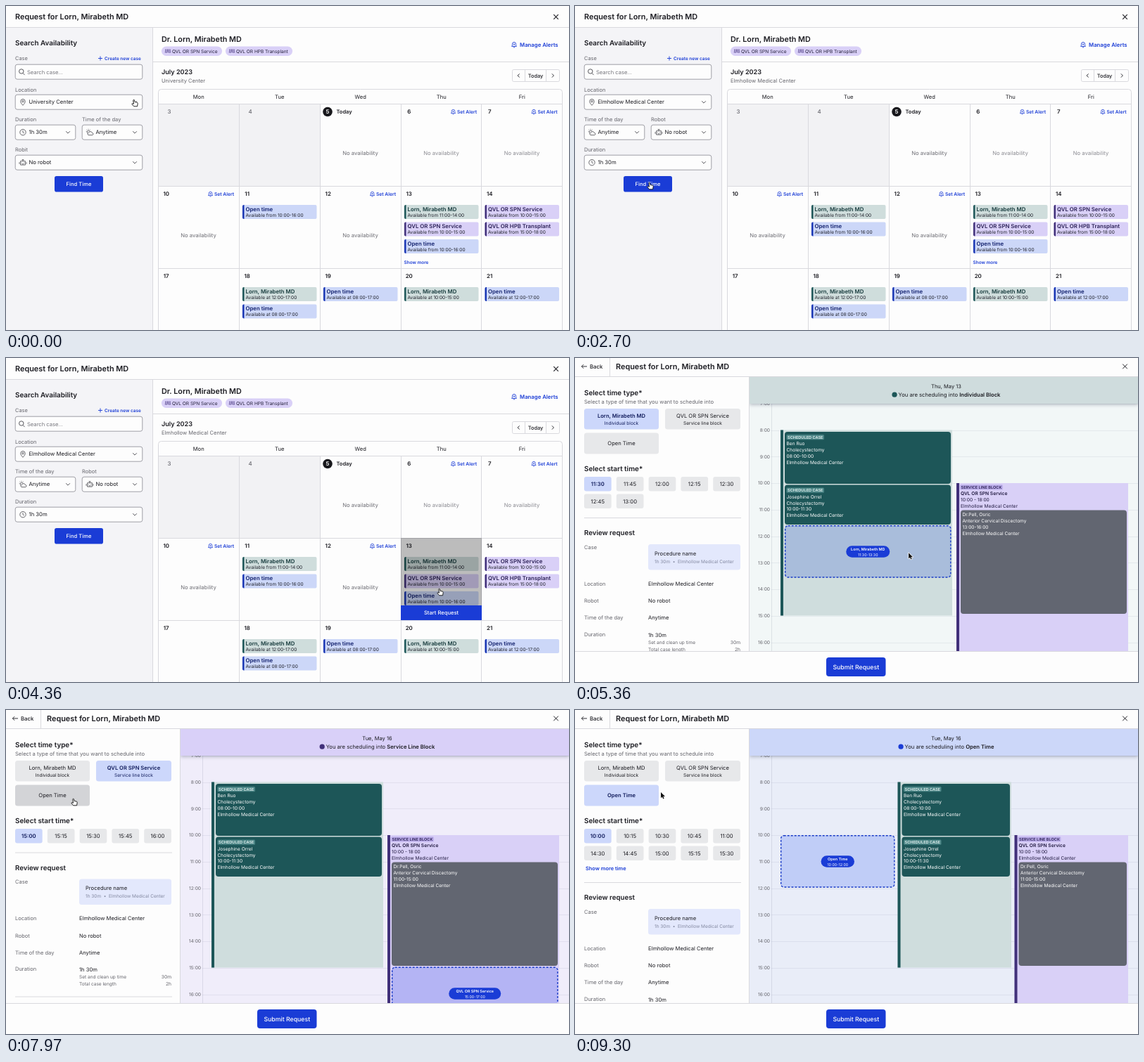
Recreate the animation shown at these times as an HTML page with a canvas. Size 800 by 461 pixels, loop 9.33 s.

```html
<!DOCTYPE html>
<html lang="en">
<head>
<meta charset="utf-8">
<title>Scheduling request</title>
<style>
html, body { margin: 0; width: 100%; height: 100%; overflow: hidden; background: #fdfdfd; }
canvas { display: block; width: 800px; height: 461px; }
</style>
</head>
<body>
<canvas id="stage"></canvas>
<script>
const canvas = document.getElementById('stage');
const ctx = canvas.getContext('2d');
const ratio = window.devicePixelRatio || 1;
canvas.width = 800 * ratio;
canvas.height = 461 * ratio;
ctx.textRendering = 'geometricPrecision';

const LOOP = 9330;
// Moments at which the screen changes, in ms
const AT = { menu: 250, pick: 1010, find: 1950, results: 2700, start: 4850, service: 7080, open: 8400 };

const DOCTOR = 'Lorn, Mirabeth MD';
const SERVICE = 'QVL OR SPN Service';
const TRANSPLANT = 'QVL OR HPB Transplant';
const CLINIC = 'Elmhollow Medical Center';

const BLUE = '#1a3cd6', INK = '#1c1c22', GREY = '#66666d', LINE = '#d9d9de', EDGE = '#96969d', WHITE = '#fdfdfd';
const KIND = {
  own: { title: DOCTOR, fill: '#cfdddc', bar: '#1d5658', ink: '#173b3d' },
  service: { title: SERVICE, fill: '#d9d0f7', bar: '#41307a', ink: '#2c2157' },
  transplant: { title: TRANSPLANT, fill: '#d9d0f7', bar: '#41307a', ink: '#2c2157' },
  open: { title: 'Open time', fill: '#ccd7f8', bar: '#1a37b4', ink: '#14236f' }
};

const ICON = {
  search: 'M3 -.5A3.2 3.2 0 1 1 -3.4 -.5A3.2 3.2 0 1 1 3 -.5M2 2L4.6 4.6',
  pin: 'M0 4.6C-2 2.4 -3.2 .8 -3.2 -1A3.2 3.2 0 0 1 3.2 -1C3.2 .8 2 2.4 0 4.6ZM1.2 -1A1.2 1.2 0 1 1 -1.2 -1A1.2 1.2 0 1 1 1.2 -1',
  clock: 'M4.2 0A4.2 4.2 0 1 1 -4.2 0A4.2 4.2 0 1 1 4.2 0M0 -2.6V.2L1.8 1.2',
  weather: 'M-1 4H3.8A1.7 1.7 0 0 0 3.4 .7A2.6 2.6 0 0 0 -1.4 .4A1.8 1.8 0 0 0 -1 4ZM-3.4 1A2 2 0 1 1 .1 -1.6M-2 -4.8V-3.9M-5.2 -1.4H-4.4M-4.4 -3.8L-3.7 -3.2M.5 -3.8L-.2 -3.2',
  robot: 'M-3.4 -2H3.4V3.4H-3.4ZM-5 -.4V2M5 -.4V2M0 -2V-4M-1.5 -4H1.5M-1.6 0V.9M1.6 0V.9M-1.4 2.2H1.4',
  bell: 'M-3.4 2.4H3.4C2.4 1.4 2.6 .2 2.5 -1A2.5 2.5 0 0 0 -2.5 -1C-2.6 .2 -2.4 1.4 -3.4 2.4ZM-1 3.8H1M-1 -.4H1M0 -1.4V.6',
  people: 'M-1.1 -1.2A1.1 1.1 0 1 1 1.1 -1.2A1.1 1.1 0 1 1 -1.1 -1.2M-2 3V1.2H2V3M-2.4 -2.2H-3.4V-.6H-2.4M2.4 -2.2H3.4V-.6H2.4M-3.8 2.6V.8H-2.6M3.8 2.6V.8H2.6',
  down: 'M-2.8 -1.4L0 1.4L2.8 -1.4',
  left: 'M1.2 -2.6L-1.4 0L1.2 2.6',
  right: 'M-1.2 -2.6L1.4 0L-1.2 2.6',
  close: 'M-3.3 -3.3L3.3 3.3M3.3 -3.3L-3.3 3.3',
  back: 'M4 0H-3.6M-.8 -2.8L-3.6 0L-.8 2.8',
  plus: 'M-3 0H3M0 -3V3'
};
for (const name in ICON) ICON[name] = new Path2D(ICON[name]);
const ARROW = new Path2D('M0 0V8.2L1.9 6.5L3.2 9.4L4.6 8.8L3.3 6H6Z');
const HAND = new Path2D('M-2.2 -4.2Q-1.3 -5.3 -.5 -4.2L.1 -1.4L3 -1Q4.2 -.7 4.2 .6L3.6 4.8H-1.2L-4 1.8Q-4.2 .6 -3 .6L-1.5 1.3Z');

function icon(name, x, y, color = INK, width = .9, scale = 1) {
  ctx.save();
  ctx.translate(x, y);
  ctx.scale(scale, scale);
  ctx.strokeStyle = color;
  ctx.lineWidth = width;
  ctx.stroke(ICON[name]);
  ctx.restore();
}

function rect(x, y, right, bottom, fill) {
  ctx.fillStyle = fill;
  ctx.fillRect(x, y, right - x, bottom - y);
}

function box(x, y, right, bottom, radius, fill, stroke, width = 1) {
  ctx.beginPath();
  ctx.roundRect(x, y, right - x, bottom - y, radius);
  if (fill) { ctx.fillStyle = fill; ctx.fill(); }
  if (stroke) { ctx.strokeStyle = stroke; ctx.lineWidth = width; ctx.stroke(); }
}

function dot(x, y, r, fill) {
  ctx.beginPath();
  ctx.arc(x, y, r, 0, Math.PI * 2);
  ctx.fillStyle = fill;
  ctx.fill();
}

function shadow(color, blur, y, draw) {
  ctx.save();
  ctx.shadowColor = color;
  ctx.shadowBlur = blur * ratio;
  ctx.shadowOffsetY = y * ratio;
  draw();
  ctx.restore();
}

const font = (size, weight) => { ctx.font = `${weight} ${size}px Inter, sans-serif`; };

// y is the middle of the capital letters
function text(str, x, y, size, weight = 400, color = INK, align = 'left') {
  font(size, weight);
  ctx.textAlign = align;
  ctx.fillStyle = color;
  ctx.fillText(str, x, y + size * .36);
}

const centred = (str, x, y, size, weight, color) => text(str, x, y, size, weight, color, 'center');

function rich(parts, cx, y, size, color) {
  const widths = parts.map(([str, weight]) => { font(size, weight); return ctx.measureText(str).width; });
  let x = cx - widths.reduce((a, b) => a + b) / 2;
  const start = x;
  parts.forEach(([str, weight], i) => {
    text(str, x, y, size, weight, color);
    x += widths[i];
  });
  return start;
}

/* ---------- search screen ---------- */

const inputBox = (x, y, right) => box(x + .2, y + .2, right - .2, y + 21.2, 2.8, WHITE, EDGE, .9);

function field(x, y, right, iconName, value) {
  inputBox(x, y, right);
  icon(iconName, x + 11, y + 10.7, '#44444b', .8);
  text(value, x + 19.5, y + 10.7, 7.7, 400);
  icon('down', right - 11, y + 10.7, '#44444b');
}

function sidebar(t) {
  const picked = t >= AT.pick;
  rect(0, 31, 208, 461, '#f4f4f7');
  rect(208, 31, 209, 461, LINE);
  text('Search Availability', 13, 52, 9.9, 600);
  text('Case', 13, 74.5, 7.4, 400, GREY);
  icon('plus', 134, 74.5, BLUE);
  text('Create new case', 140, 74.5, 6.45, 600, BLUE);
  inputBox(13, 83, 194);
  icon('search', 22, 93.5, '#44444b', .9);
  text('Search case...', 30, 94, 7.6, 400, '#77777e');

  const label = (str, x, y) => text(str, x, y, 7.5, 400, GREY);
  label('Location', 13, 119);
  field(13, 126, 194, 'pin', picked ? CLINIC : 'University Center');
  label(picked ? 'Time of the day' : 'Duration', 13, 161.5);
  label(picked ? 'Robot' : 'Time of the day', 108, 161.5);
  label(picked ? 'Duration' : 'Robit', 13, 204.5);
  if (picked) {
    field(13, 169, 99, 'weather', 'Anytime');
    field(108, 169, 194, 'robot', 'No robot');
    field(13, 212, 194, 'clock', '1h 30m');
  } else {
    field(13, 169, 99, 'clock', '1h 30m');
    field(108, 169, 194, 'weather', 'Anytime');
    field(13, 212, 194, 'robot', 'No robot');
  }
  box(69, 242, 138, 264.5, 2.8, BLUE);
  centred('Find Time', 103.5, 253.5, 7.6, 500, '#fff');

  if (t >= AT.menu && !picked) {
    shadow('rgba(0,0,0,.2)', 4, 1, () => box(13, 150, 194, 206, 2.5, WHITE));
    if (pointer(t).y > 178) rect(13, 178, 194, 205, '#e7e8ec');
    text('University Center', 32.5, 164, 7.7);
    text(CLINIC, 32.5, 191.5, 7.7);
  }
}

function pill(x, right, label) {
  box(x, 57.5, right, 71, 6.7, '#d9d0f7');
  icon('people', x + 9, 64, '#41307a', .8, .95);
  text(label, x + 15, 64.3, 6.55, 400, '#24203a');
}

function doctorBar() {
  text('Dr. ' + DOCTOR, 221, 47.5, 10.75, 600);
  pill(221, 307, SERVICE);
  pill(312, 407, TRANSPLANT);
  icon('bell', 722, 55, BLUE);
  text('Manage Alerts', 730, 55.3, 7.75, 600, BLUE);
  rect(209, 79, 800, 80, LINE);
}

const COLS = [216, 331, 446, 561, 675.5, 791];
const ROWS = [139, 256, 373];

function slot(col, row, place, kind, hours) {
  const x = COLS[col] + 5, y = ROWS[row] + 27 + place * 24.5, k = KIND[kind];
  box(x, y, x + 105.5, y + 20, 2, k.fill);
  box(x, y, x + 2.5, y + 20, [2, 0, 0, 2], k.bar);
  text(k.title, x + 4.5, y + 6, 7.8, 600, k.ink);
  text(`Available ${row === 1 ? 'from' : 'at'} ${hours}`, x + 4.5, y + 14.6, 6.5, 400, '#22242e');
}

function setAlert(col, row) {
  icon('bell', COLS[col] + 74.5, ROWS[row] + 11.5, BLUE, .9, .9);
  text('Set Alert', COLS[col] + 80, ROWS[row] + 11.7, 6.7, 600, BLUE);
}

const none = (col, row, color = '#6c6c73') =>
  centred('No availability', COLS[col] + 57.5, ROWS[row] + 69.8, 7.7, 400, color);

function calendar(t) {
  const found = t >= AT.results;
  text('July 2023', 221, 93.3, 9.1, 600);
  text(found ? CLINIC : 'University Center', 221, 105.8, 7.55, 400, GREY);
  box(719.5, 90.5, 786.5, 107.5, 2, WHITE, LINE);
  rect(737, 91, 738, 107, LINE);
  rect(767, 91, 768, 107, LINE);
  icon('left', 728.5, 99);
  icon('right', 777, 99);
  centred('Today', 752.5, 99.2, 7.4, 500);

  rect(217, 139, 446, 256, '#f2f2f4');
  box(216.5, 118.5, 790.5, 480, 4, null, LINE);
  ['Mon', 'Tue', 'Wed', 'Thu', 'Fri'].forEach((day, i) => {
    centred(day, COLS[i] + 57.7, 129, 7.6);
    if (i) rect(Math.floor(COLS[i]), 139, Math.floor(COLS[i]) + 1, 461, LINE);
  });
  for (const y of ROWS) rect(216, y, 791, y + 1, LINE);

  [3, 10, 17].forEach((first, row) => {
    for (let col = 0; col < 5; col++) {
      const past = row === 0 && col < 2;
      if (first + col === 5) continue;
      centred(first + col, COLS[col] + (past ? 16 : 11.7), ROWS[row] + 11.5, 7.9, past ? 500 : 600, past ? GREY : INK);
    }
  });
  dot(457, 150.5, 6.8, '#18181c');
  centred('5', 457, 150.5, 7.9, 600, '#fff');
  text('Today', 469.5, 150.5, 7.5, 600);

  [[3, 0], [4, 0], [0, 1], [2, 1]].forEach(([c, r]) => setAlert(c, r));
  none(2, 0);
  none(3, 0, '#8a8a91');
  none(4, 0, '#8a8a91');
  none(0, 1);
  none(2, 1);

  if (found) slot(1, 1, 0, 'own', '11:00-14:00');
  slot(1, 1, found ? 1 : 0, 'open', '10:00-16:00');
  slot(3, 1, 0, 'own', '11:00-14:00');
  slot(3, 1, 1, 'service', '10:00-15:00');
  slot(3, 1, 2, 'open', '10:00-16:00');
  slot(4, 1, 0, 'service', '10:00-15:00');
  slot(4, 1, 1, 'transplant', '15:00-18:00');
  slot(1, 2, 0, 'own', '12:00-17:00');
  slot(1, 2, 1, 'open', '08:00-17:00');
  slot(2, 2, 0, 'open', '08:00-17:00');
  slot(3, 2, 0, 'own', '10:00-15:00');
  slot(4, 2, 0, 'open', '12:00-17:00');
  text('Show more', 565.5, 364.5, 6.45, 600, BLUE);

  if (found && inside(pointer(t), [561, 256, 676, 373])) {
    rect(561, 256, 676, 373, 'rgba(0,0,0,.26)');
    rect(561, 352, 676, 373, BLUE);
    centred('Start Request', 618.5, 362.5, 7.6, 500, '#fff');
  }
}

function skeleton(t) {
  const bone = '#f0f0f1', cols = [218, 332, 446, 560, 674], rows = [139, 215, 288, 362, 435];
  box(221, 88.5, 261, 97, 4, bone);
  box(221, 102, 338, 110.5, 4, bone);
  box(712, 90.5, 786, 108, 2, bone);
  box(218.5, 118.5, 788, 480, 2, null, '#e2e2e5');
  cols.forEach((x, i) => {
    if (i) rect(x, 119, x + 1, 461, '#e2e2e5');
    text(['MON', 'TUE', 'WED', 'THU', 'FRI'][i], x + 7, 129, 6.4, 600, '#cfcfd3');
    rows.forEach((y, row) => {
      if (row < 4 || i < 2) box(x + 5, y + (row ? 18.5 : 20.5), x + 108.5, y + (row ? 36 : 38), 2, bone);
    });
  });
  for (const y of rows) rect(218, y, 788, y + 1, '#e2e2e5');

  const alpha = 1 - Math.min(1, Math.max(0, (t - AT.find) / 200));
  if (!alpha) return;
  ctx.globalAlpha = alpha;
  shadow('rgba(0,0,0,.35)', 5, 2, () => box(425, 251, 582.5, 291, 4, '#2a3140'));
  centred('You’ve changed your search criteria.', 503.7, 265.5, 7.55, 400, '#fff');
  rich([['Click ', 400], ['“Find Time”', 600], [' to search availability.', 400]], 503.7, 276.5, 7.5, '#fff');
  ctx.globalAlpha = 1;
}

function searchScreen(t) {
  text('Request for ' + DOCTOR, 13, 15.3, 10.9, 600);
  icon('close', 781.5, 15.5, INK, 1.1);
  rect(0, 30, 800, 31, LINE);
  doctorBar();
  if (t >= AT.pick && t < AT.results) skeleton(t); else calendar(t);
  sidebar(t);
}

/* ---------- request screen ---------- */

const TYPES = [
  { area: [13, 72, 119, 101.5], title: DOCTOR, note: 'Individual block' },
  { area: [128, 72, 235, 101.5], title: SERVICE, note: 'Service line block' },
  { area: [13, 106.5, 119, 136.5], title: 'Open Time' }
];
const MODES = [
  { review: 249, rule: 227, day: 'Thu, May 13', into: 'Individual Block', band: '#cfdcdd', back: '#f2f7f7',
    dot: '#1d5658', times: ['11:30', '11:45', '12:00', '12:15', '12:30', '12:45', '13:00'] },
  { review: 224.5, rule: 202.5, day: 'Tue, May 16', into: 'Service Line Block', band: '#d9d0f8', back: '#f0edfa',
    dot: '#41307a', times: ['15:00', '15:15', '15:30', '15:45', '16:00'] },
  { review: 267, rule: 245, day: 'Tue, May 16', into: 'Open Time', band: '#ccd7f9', back: '#e9edf8',
    dot: BLUE, times: ['10:00', '10:15', '10:30', '10:45', '11:00', '14:30', '14:45', '15:00', '15:15', '15:30'] }
];

const modeAt = t => t < AT.service ? 0 : t < AT.open ? 1 : 2;

function chipArea(i) {
  const x = 13 + (i % 5) * 45.8, y = 169 + Math.floor(i / 5) * 24.5;
  return [x, y, x + 38.7, y + 20.5];
}

const buttonFill = (chosen, area, p) => chosen ? '#ccd7fb' : inside(p, area) ? '#d3d4d7' : '#e7e8ea';

function requestPanel(mode, p) {
  const m = MODES[mode], r = m.review;
  text('Select time type*', 13, 49, 9.9, 600);
  text('Select a type of time that you want to schedule into', 13, 62, 7.6, 400, GREY);
  TYPES.forEach(({ area, title, note }, i) => {
    const chosen = i === mode, cx = (area[0] + area[2]) / 2, ink = chosen ? '#111c5c' : INK;
    box(...area, 3.5, buttonFill(chosen, area, p));
    centred(title, cx, note ? 82 : 121.5, 7.6, chosen ? 600 : 400, ink);
    if (note) centred(note, cx, 92.3, 6.55, 400, ink);
  });

  text('Select start time*', 13, 157.7, 9.9, 600);
  m.times.forEach((time, i) => {
    const area = chipArea(i);
    box(...area, 3, buttonFill(i === 0, area, p));
    centred(time, area[0] + 19.3, area[1] + 10.5, 7.7, i ? 400 : 600, i ? INK : '#111c5c');
  });
  if (mode === 2) text('Show more time', 15, 225, 7.4, 600, BLUE);

  rect(13, m.rule, 236, m.rule + 1, LINE);
  text('Review request', 13, r, 9.7, 600);
  box(104, r + 16, 235, r + 52.5, 3.5, '#e3e8fc');
  text('Procedure name', 113, r + 29, 7.6);
  text('1h 30m  •  ' + CLINIC, 113, r + 40.5, 6.5, 400, '#8288a0');
  const rows = [['Case', '', 20], ['Location', CLINIC, 72], ['Robot', 'No robot', 96.3],
    ['Time of the day', 'Anytime', 120.7], ['Duration', '1h 30m', 144]];
  for (const [label, value, dy] of rows) {
    text(label, 13, r + dy, 7.5, 400, GREY);
    text(value, 104, r + dy + (label === 'Duration' ? 1.2 : 0), 7.6);
  }
  [['Set and clean up time', '30m', 155.5], ['Total case length', '2h', 165.5]].forEach(([label, value, dy]) => {
    text(label, 104, r + dy, 6.55, 400, GREY);
    text(value, 235, r + dy, 6.7, 400, GREY, 'right');
  });
  rect(13, r + 183, 236, r + 184, LINE);
}

function tag(str, x, y, fill, color) {
  font(5.6, 600);
  box(x, y - 3.7, x + ctx.measureText(str).width + 3, y + 3.5, 1.5, fill);
  text(str, x + 1.5, y, 5.6, 600, color);
}

const lines = (list, x, y, color) => list.forEach((str, i) => text(str, x, y + i * 8.9, 6.6, 400, color));

function ownColumn(x, right) {
  rect(x, 102.5, right, 366.5, '#cfdddd');
  rect(x, 102.5, x + 4, 366.5, '#1d5658');
  const cases = [[105, 179, 'Ben Ruo', '08:00-10:00'], [180.5, 237, 'Josephine Orrel', '10:00-11:30']];
  for (const [top, bottom, patient, hours] of cases) {
    box(x + 6, top, right - 2, bottom, 4, '#1d5658');
    tag('SCHEDULED CASE', x + 8.5, top + 7.8, '#4b8586', '#e6f3f2');
    lines([patient, 'Cholecystectomy', hours, CLINIC], x + 8.5, top + 16.8, '#fff');
  }
}

function serviceColumn(x, right, mode) {
  rect(x, 178, right, 417, '#d9d0f7');
  rect(x, 178, x + 4, 417, '#41307a');
  tag('SERVICE LINE BLOCK', x + 5, 184, '#bcaeea', '#2c2157');
  text(SERVICE, x + 6, 192.5, 6.7, 600, '#211a40');
  lines(['10:00 - 18:00', CLINIC], x + 6, 201.3, '#211a40');
  box(x + 6, 216.5, right - 2, 364, 4, '#626671');
  lines(['Dr.Pell, Osric', 'Anterior Cervical Discectomy', mode ? '11:00-15:00' : '13:00-16:00', CLINIC], x + 8.5, 222.7, '#fff');
}

function booking(x, y, right, fill, name, hours, half, cy) {
  ctx.setLineDash([3, 2]);
  box(x + .7, y + .7, right - .7, y + 74, 4, fill, '#1a3cc8', 1.4);
  ctx.setLineDash([]);
  const cx = (x + right) / 2;
  box(cx - half, cy - 8.3, cx + half, cy + 8.3, 8.3, BLUE);
  centred(name, cx, cy - 3.5, 5.4, 600, '#fff');
  centred(hours, cx, cy + 4.2, 5.3, 400, '#fff');
}

function schedule(mode) {
  const m = MODES[mode];
  rect(248, 27, 800, 417, m.back);
  ctx.save();
  ctx.beginPath();
  ctx.rect(248, 27, 552, 390);
  ctx.clip();
  for (let hour = 7; hour <= 16; hour++) {
    const y = 102.5 + (hour - 8) * 37.75;
    rect(279, Math.round(y), 800, Math.round(y) + 1, 'rgba(60,70,100,.08)');
    text(hour + ':00', 277, y, 6.6, 400, GREY, 'right');
  }
  rect(279, 65, 280, 417, 'rgba(60,70,100,.12)');
  if (mode === 2) {
    ownColumn(458.5, 620);
    serviceColumn(624.5, 786, mode);
    booking(292, 178, 454.5, '#c0cdf7', 'Open Time', '10:00-12:00', 23.7, 215.5);
  } else {
    ownColumn(292, 536);
    serviceColumn(542, 786, mode);
    if (mode === 0) booking(298, 238, 534.5, '#a9bddb', DOCTOR, '11:30-13:30', 31, 275.5);
    else booking(548, 365.5, 784.5, '#b4b4f4', SERVICE, '15:00-17:00', 37, 403.5);
  }
  shadow('rgba(30,40,70,.3)', 5, 1.5, () => rect(248, 27, 800, 65, m.band));
  centred(m.day, 527.5, 40.3, 7.5);
  const start = rich([['You are scheduling into ', 400], [m.into, 600]], 532, 52.3, 7.65, INK);
  dot(start - 5.5, 52.2, 3.6, m.dot);
  ctx.restore();
}

function requestScreen(t, p) {
  const mode = modeAt(t);
  requestPanel(mode, p);
  rect(247, 27, 248, 417, LINE);
  schedule(mode);
  rect(0, 26, 800, 27, LINE);
  rect(49, 0, 50, 26, LINE);
  icon('back', 13, 12);
  text('Back', 21, 12, 7.8, 500);
  text('Request for ' + DOCTOR, 58, 12, 10.9, 600);
  icon('close', 781.5, 12, INK, 1);
  rect(0, 417, 800, 461, WHITE);
  rect(0, 417, 800, 418, LINE);
  box(357, 426, 441.5, 453, 4, BLUE);
  centred('Submit Request', 399.3, 439.7, 8.75, 500, '#fff');
}

/* ---------- pointer ---------- */

const PATH = [
  [0, 183, 138], [350, 183, 138], [800, 150, 189], [1080, 150, 189], [1360, 155, 191], [1820, 106, 255],
  [2700, 107, 256], [3450, 381, 317], [3640, 382, 317], [4360, 617, 333], [4660, 620, 362],
  [4980, 620, 362], [5940, 200, 118], [6090, 200, 116], [6610, 221, 96], [7250, 221, 96],
  [7970, 97, 131], [8650, 97, 131], [9200, 122, 117], [LOOP, 122, 117]
];

function pointer(t) {
  const i = PATH.findIndex((key, n) => n && t <= key[0]);
  const [t0, x0, y0] = PATH[i - 1], [t1, x1, y1] = PATH[i];
  const k = (t - t0) / (t1 - t0), e = k * k * (3 - 2 * k);
  return { x: x0 + (x1 - x0) * e, y: y0 + (y1 - y0) * e };
}

const inside = (p, [x, y, right, bottom]) => p.x >= x && p.x < right && p.y >= y && p.y < bottom;

function clickable(t) {
  if (t >= AT.start) {
    return [...TYPES.map(type => type.area), ...MODES[modeAt(t)].times.map((_, i) => chipArea(i))];
  }
  const areas = [[13, 126, 194, 147], [13, 169, 99, 190], [108, 169, 194, 190], [13, 212, 194, 233], [69, 242, 138, 264]];
  if (t >= AT.menu && t < AT.pick) areas.push([13, 150, 194, 206]);
  if (t >= AT.results) areas.push([336, 283, 441, 327], [561, 256, 676, 373]);
  return areas;
}

function drawPointer(t, p) {
  const hand = clickable(t).some(area => inside(p, area));
  const shape = hand ? HAND : ARROW;
  ctx.save();
  ctx.translate(p.x, p.y);
  ctx.lineJoin = 'round';
  ctx.lineWidth = hand ? .9 : 1.4;
  ctx.strokeStyle = hand ? '#111' : '#fff';
  ctx.fillStyle = hand ? '#fff' : '#111';
  if (!hand) ctx.stroke(shape);
  ctx.fill(shape);
  if (hand) ctx.stroke(shape);
  ctx.restore();
}

const began = performance.now();

function frame(now) {
  const t = Math.max(0, now - began) % LOOP, p = pointer(t);
  ctx.setTransform(ratio, 0, 0, ratio, 0, 0);
  rect(0, 0, 800, 461, WHITE);
  if (t < AT.start) searchScreen(t); else requestScreen(t, p);
  drawPointer(t, p);
  requestAnimationFrame(frame);
}
frame(began);
</script>
</body>
</html>
```
